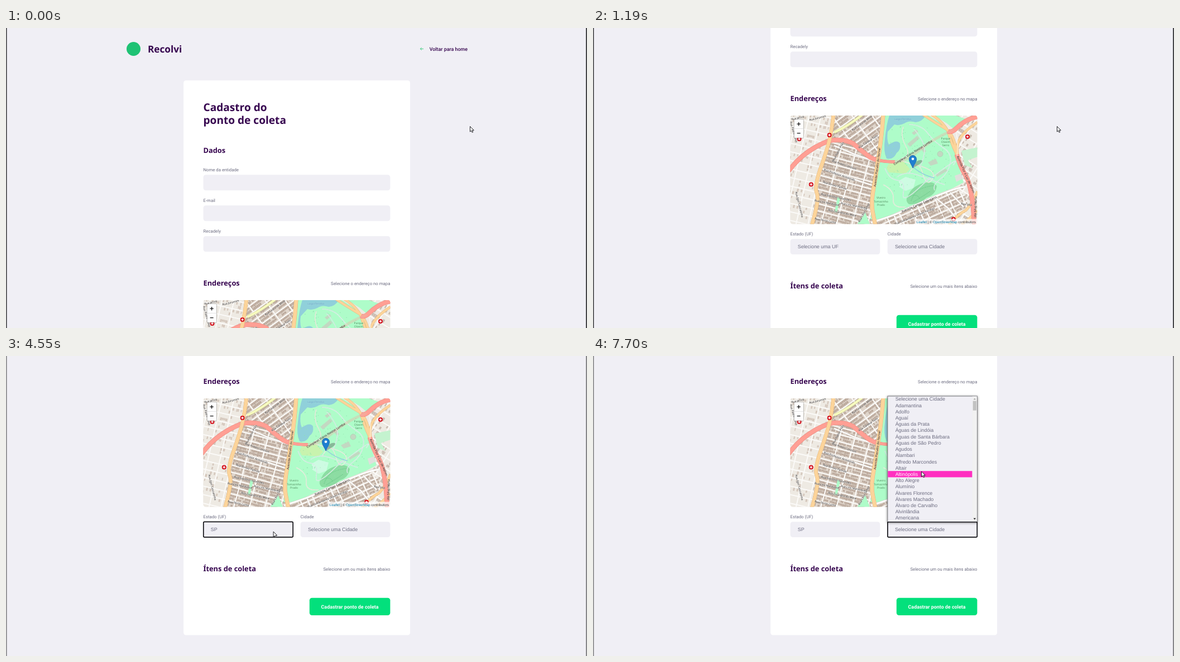
Write an HTML page that moves like this. It is 1041 px wide and 538 px high and loops after 8000 ms.

```html
<!DOCTYPE html>
<html lang="pt-BR">
<head>
<meta charset="utf-8">
<title>Cadastro do ponto de coleta</title>
<style>
  html, body { margin: 0; width: 100%; height: 100%; overflow: hidden; background: #f0eff5; }
  svg { display: block; width: 1041px; height: 538px; }
  text { white-space: pre; text-rendering: geometricPrecision; }
  .head { font: 700 12.8px "Noto Sans", sans-serif; fill: #36054f; }
  .big { font-size: 19.1px; }
  .logo { font-size: 17.2px; }
  .body { font: 400 7.79px Roboto, sans-serif; fill: #6c6c80; }
  .link { font: 500 8.9px Roboto, sans-serif; fill: #36054f; }
  .btn { font: 700 8.9px Roboto, sans-serif; fill: #fff; }
  .input { font: 400 8.9px "Liberation Sans", Arial, sans-serif; fill: #6c6c80; }
  .credit { font: 400 6.1px "Liberation Sans", Arial, sans-serif; fill: #333; }
  .street { font: 500 5px "Noto Sans", sans-serif; fill: #262220; stroke: #fff; stroke-width: .8; paint-order: stroke; stroke-opacity: .6; }
  .road { font-size: 5.5px; fill: #1d1512; stroke-opacity: .25; }
  .green { fill: #3f9458; stroke: #c5f7d4; }
  .lake { fill: #5b9fc0; stroke: #b5dfe6; }
</style>
</head>
<body>
<svg id="stage" viewBox="0 0 1041 538"></svg>
<script>
const NS = 'http://www.w3.org/2000/svg';
const stage = document.getElementById('stage');

function el(tag, attrs, parent, text) {
  const n = document.createElementNS(NS, tag);
  for (const k in attrs) n.setAttribute(k, attrs[k]);
  if (text !== undefined) n.textContent = text;
  parent.appendChild(n);
  return n;
}
const box = (p, x, y, w, h, fill, rx = 0) => el('rect', { x, y, width: w, height: h, fill, rx }, p);
const label = (p, cls, x, y, s, anchor = 'start') =>
  el('text', { class: cls, x, y, 'text-anchor': anchor }, p, s);
const shape = (p, d, fill) => el('path', { d, fill }, p);
const line = (p, d, stroke, w, extra = {}) =>
  el('path', { d, stroke, 'stroke-width': w, fill: 'none', ...extra }, p);

let seed = 7;
const rnd = () => (seed = (seed * 16807) % 2147483647) / 2147483647;

const defs = el('defs', {}, stage);
const FIELD = '#f0eff5', GREEN = '#03e07c';
const LEFT = 353.5, RIGHT = 688.4, RADIUS = 4.5;

/* ---------- page ---------- */
box(stage, 0, 0, 1041, 538, FIELD);
const page = el('g', {}, stage);

el('circle', { cx: 228.5, cy: 37.5, r: 12.5, fill: '#1fc274' }, page);
label(page, 'head logo', 254, 43.8, 'Recolvi');
line(page, 'M748 37.4H742.3M744.8 34.9L742.3 37.4L744.8 39.9', '#34cb79', 0.9);
label(page, 'link', 758.7, 40.7, 'Voltar para home');

box(page, 318.1, 94, 406, 818.5, '#fff', RADIUS);
label(page, 'head big', LEFT, 148.5, 'Cadastro do');
label(page, 'head big', LEFT, 171.8, 'ponto de coleta');
label(page, 'head', LEFT, 223.7, 'Dados');
['Nome da entidade', 'E-mail', 'Recadely'].forEach((s, i) => {
  label(page, 'body', LEFT, 256.8 + i * 55, s);
  box(page, LEFT, 263.2 + i * 55, RIGHT - LEFT, 28.1, FIELD, RADIUS);
});
label(page, 'head', LEFT, 462.2, 'Endereços');
label(page, 'body', RIGHT, 460.7, 'Selecione o endereço no mapa', 'end');
drawMap(el('g', { transform: 'translate(0 412)' }, page));

function select(x, name, value) {
  label(page, 'body', x, 703.2, name);
  box(page, x, 709.2, 160.8, 27.8, FIELD, RADIUS);
  const ring = el('rect', { x: x + .3, y: 709.4, width: 160.4, height: 27.4, rx: 1.8,
    fill: FIELD, stroke: '#101014', 'stroke-width': 1.7 }, page);
  return { ring, text: label(page, 'input', x + 13.3, 726.1, value) };
}
const uf = select(LEFT, 'Estado (UF)', 'Selecione uma UF');
const town = select(527.6, 'Cidade', 'Selecione uma Cidade');

label(page, 'head', LEFT, 798.1, 'Ítens de coleta');
label(page, 'body', RIGHT, 796.5, 'Selecione um ou mais ítens abaixo', 'end');
box(page, 543.8, 845.8, 144.6, 31.2, GREEN, RADIUS);
label(page, 'btn', 616, 864.8, 'Cadastrar ponto de coleta', 'middle');

/* ---------- map ---------- */
function district(g, id, poly, ang, cx, cy, a, b, fill, ground, density) {
  const clip = el('clipPath', { id }, defs);
  el('polygon', { points: poly }, clip);
  const out = el('g', { 'clip-path': `url(#${id})` }, g);
  box(out, 350, 70, 345, 205, '#fbfaf8');
  const inner = el('g', { transform: `rotate(${ang} ${cx} ${cy})` }, out);
  let lots = '', homes = '';
  const bar = (x, y, w, h) => `M${x.toFixed(1)} ${y.toFixed(1)}h${w.toFixed(1)}v${h.toFixed(1)}h${(-w).toFixed(1)}z`;
  for (let y = cy - 130; y < cy + 130; y += a)
    for (let x = cx - 130; x < cx + 130; x += b) {
      lots += bar(x + 1, y + 1, b - 2, a - 2);
      for (let u = x + 1.4; u < x + b - 3; ) {
        const w = 1.4 + rnd() * 2.2, h = (a - 3.2) / 2;
        for (const v of [y + 1.4, y + a / 2 + .2])
          if (rnd() < density) homes += bar(u, v, w, h * (.6 + rnd() * .4));
        u += w + .35;
      }
    }
  shape(inner, lots, ground);
  shape(inner, homes, fill);
}

function drawMap(root) {
  const clip = el('clipPath', { id: 'mapArea' }, defs);
  box(clip, LEFT, 76, RIGHT - LEFT, 194.6, '#000', RADIUS);
  const g = el('g', { 'clip-path': 'url(#mapArea)' }, root);
  box(g, 353, 76, 336, 195, '#eeeae3');

  const brown = '#bba99c', ground = '#dfd5cb', pale = '#eeeae3';
  district(g, 'west', '353,76 431,76 424,118 403,200 392,271 353,271', 13, 390, 175, 15, 21, '#d5c8bd', pale, .16);
  district(g, 'mid', '424,120 458,122 497,152 514,156 504,205 500,271 391,271 404,200', 15, 450, 200, 12.5, 27, brown, ground, .9);
  district(g, 'north', '431,76 519,76 513,156 495,150 458,122 424,118', -36, 470, 110, 13, 29, brown, ground, .85);
  district(g, 'east', '645,76 689,76 689,271 640,271 660,180', 32, 672, 170, 17, 24, '#c9bbb0', pale, .35);
  district(g, 'south', '500,271 556,246 650,206 668,222 672,240 645,271', -24, 590, 250, 12, 23, brown, ground, .85);

  // park
  const mint = '#aefcc9', paved = '#c3d8c2';
  shape(g, 'M521 76H602L634 96L648 125L652 155L664 196L645 206L612 219L556 244L518 262L497 262L505 212L514 150Z', mint);
  shape(g, 'M612 76H650L668 82L646 100L634 90Z', mint);
  shape(g, 'M660 139L689 133V150L672 156L680 170L666 165Z', '#c4f3cf');
  shape(g, 'M438 222l5 2l-6 26l-4-1zM476 266l12-16l8 21h-22z', mint);
  shape(g, 'M531 76H596Q590 87 578 88Q566 84 558 90Q548 95 540 92L528 105Q526 120 530 128Q545 118 550 126Q552 138 544 143Q538 156 526 153Q520 140 523 118Q526 90 531 76Z', '#90d0da');
  shape(g, 'M530 162L556 158L568 172L560 180L530 178L526 170Z', '#c8f3ae');
  shape(g, 'M548 193L560 186L578 191L574 206L560 211L549 204Z', '#cdfbe2');
  shape(g, 'M565 219Q571 203 592 197Q611 192 616 203Q613 219 598 223Q584 237 566 235Q558 228 565 219Z', '#8cdca2');
  line(g, 'M570 229Q576 210 594 205T611 203M574 231Q586 224 604 212M566 222Q580 214 586 226', '#5fc080', 1.2, { 'stroke-dasharray': '1 1.6' });
  shape(g, 'M563 127L581 112L585 117L568 132ZM571 107l9-6l3 4l-8 6zM600 160L614 153L618 162L605 166ZM590 131l7 9l-4 3l-7-9zM614 181l18-10l3 4l-19 11z', paved);
  shape(g, 'M648 184l11-4l4 9l-12 6z', '#dfe0dc');
  el('circle', { cx: 622, cy: 145, r: 5, fill: paved, stroke: '#a9c8ae', 'stroke-width': .6 }, g);
  for (let i = 0; i < 130; i++) {
    const x = 524 + rnd() * 118, y = 96 + rnd() * 122;
    el('circle', { cx: x, cy: y, r: .4 + rnd() * .5, fill: '#8fe3ae' }, g);
  }
  ['M523 170Q530 190 545 192T556 215T585 205T600 190T622 176T645 165',
   'M556 96Q550 112 560 130T556 152T580 165T608 190T590 178T566 181',
   'M566 92Q588 92 600 108T628 134T640 162T622 190T612 210',
   'M520 200Q540 210 538 226T560 240', 'M585 170Q600 140 590 122T574 100M545 186Q560 175 580 182T630 200'
  ].forEach((d, i) => {
    line(g, d, '#e4fdec', 1.5);
    line(g, d, i % 2 ? '#eda79e' : '#a9a4cc', .7, { 'stroke-dasharray': '1.2 1.1' });
  });
  line(g, 'M573 168Q590 183 612 188', '#8fd0dc', 1.6);

  // roads
  const road = (d, w, c, edge) => { line(g, d, edge, w + .8); line(g, d, c, w); };
  const amber = ['#fcd49a', '#dcb078'], salmon = ['#ff9f94', '#e58379'], white = ['#fff', '#cfc8c0'];
  road('M498 268Q540 255 556 247T614 221T668 204', 3, ...white);
  road('M612 222L636 242L652 262M580 235L592 262M540 256L546 271M640 214L664 240', 2.2, ...white);
  road('M432 106Q452 98 482 75', 4, '#f7fabf', '#c9cd8c');
  road('M432 130Q452 138 470 146L505 158M412 172L500 201', 2.2, ...white);
  road('M591 74Q612 88 634 101Q650 114 651 150M606 74Q626 86 636 104Q642 125 650 142M689 88Q664 104 656 120Q650 134 654 150', 4, ...amber);
  road('M638 272Q655 252 668 246Q680 234 689 212M660 271Q676 262 688 246', 4, ...amber);
  road('M689 78Q668 82 652 98Q642 108 636 104', 7.5, ...salmon);
  road('M652 146Q658 168 668 184Q680 205 683 271', 7.5, ...salmon);
  road('M510 156Q524 159 541 159', 5, ...salmon);
  road('M350 176Q362 160 375 149Q398 130 424 121Q448 117 466 126Q484 142 497 151Q504 155 514 157', 7.5, ...salmon);
  line(g, 'M540 159Q562 157 576 145T607 122T646 102', '#e9b4a4', 5, { opacity: .4 });
  road('M431 74Q428 100 424 118T408 170T401 215T392 273', 6, ...amber);
  road('M520 74Q518 108 512 148T503 205Q498 232 501 248T506 273', 6.5, ...amber);
  line(g, 'M651 106Q655 128 652 150', '#fff', .8);

  // names
  const names = [
    ['Rua Jerivá', 367, 82, -13], ['Rua Jurumim', 403, 82, -14], ['Rua Padre Nolvo', 358, 106, 74],
    ['Rua Lauro de Mirel', 483, 91, -36], ['Rua Cardeal Tuvo', 494, 124, -34],
    ['Rua Prates Cordovil', 449, 166, 19], ['Rua Professor Armelindo', 441, 184, 19],
    ['Rua Dirceu Palmão', 433, 203, 17], ['Rua Petrônio Valverdes', 435, 224, 12],
    ['Rua Lins Marduque', 419, 234, 11], ['Rua Lins Marduque', 466, 239, 11],
    ['Rua Lisandro da Mota', 446, 252, 12], ['Rua Tércio Lume', 416, 266, 11],
    ['Rua Célio Tamor', 487, 251, -62], ['Rua Igor Cascatinha', 368, 236, 76],
    ['Rua Nabor Pilão', 441, 141, -62], ['Rua Comandante Otávio Perdigo', 577, 258, -22], ['Rua Ubá', 669, 237, 8]
  ];
  const roads = [
    ['Avenida Planalto do Norvel', 511, 169, -83], ['Complexo Viário Nestor Lumba', 574, 144, -32],
    ['Avenida Campo Celestário', 585, 237, -23], ['Avenida Flor e Luz de Abrim', 666, 182, 66],
    ['ida Silvo Norta', 687, 240, -88]
  ];
  const put = (cls, [s, x, y, r]) => el('text', { class: 'street ' + cls, 'text-anchor': 'middle',
    transform: `translate(${x} ${y}) rotate(${r})` }, g, s);
  names.forEach(n => put('', n));
  roads.forEach(n => put('road', n));
  ['Parque', 'Olavim', 'Serro'].forEach((s, i) => put('green', [s, 632, 118.5 + i * 6.4, 0]));
  ['Viveiro', 'Tomazinho', 'Prado'].forEach((s, i) => put('green', [s, 516, 225 + i * 6.5, 0]));
  put('lake', ['Lago Peroba', 555, 84, 0]);

  [[369.5, 118], [423.6, 111], [390.8, 199.5], [671, 114], [646, 262]].forEach(([x, y]) => {
    el('circle', { cx: x, cy: y, r: 4, fill: '#d3131f' }, g);
    line(g, `M${x - 2.2} ${y}h4.4M${x} ${y - 2.2}v4.4`, '#fff', 1.3);
  });

  // marker
  shape(g, 'M573 170L580 158Q587 154 590 157Q591 161 573 170Z', 'rgba(60,60,60,.35)');
  el('path', { d: 'M573 170.2C571 164 566.4 160 566.4 154A6.6 6.6 0 0 1 579.6 154C579.6 160 575 164 573 170.2Z',
    fill: '#1f7fd0', stroke: '#1c62a6', 'stroke-width': .8 }, g);
  el('circle', { cx: 573, cy: 153.8, r: 2.3, fill: '#fff' }, g);

  // zoom buttons
  box(g, 359.6, 82, 18.4, 35, 'rgba(0,0,0,.22)', 2.2);
  box(g, 360.6, 83, 16.4, 33, '#fff', 1.2);
  line(g, 'M360.6 99.4h16.4', '#ccc', .6);
  line(g, 'M365.4 91.2h6.4M368.6 88v6.4M365.6 107.6h6', '#111', 1.3);

  box(g, 576.5, 261.6, 112, 9, 'rgba(255,255,255,.72)');
  const c = label(g, 'credit', 685.8, 268.5, '', 'end');
  const part = (s, fill) => el('tspan', fill ? { fill } : {}, c, s);
  part('Leaflet', '#0078a8'); part(' | © '); part('OpenStreetMap', '#0078a8'); part(' contributors');
}

/* ---------- drop-down lists ---------- */
const ROW = 11.22, TOP = 71.6;

function popup(x, items, thumb, id) {
  const g = el('g', {}, stage);
  const frame = box(g, x + .3, 72, 160.4, 225.6, FIELD);
  frame.setAttribute('stroke', '#6f6f74');
  frame.setAttribute('stroke-width', .9);
  frame.style.filter = 'drop-shadow(0 1.5px 2px rgba(0,0,0,.55))';
  const clip = el('clipPath', { id }, defs);
  box(clip, x + .7, 72.4, 159.6, 224.8, '#000');
  const view = el('g', { 'clip-path': `url(#${id})` }, g);
  const list = el('g', {}, view);
  const bar = box(list, x, 0, 152, ROW, '#ff2fc0');
  const rows = items.map((s, i) => label(list, 'input', x + 14.1, TOP + (i + .5) * ROW + 3.1, s));
  box(view, x + 152, 72, 9, 226, '#f1f1f1');
  const grip = box(view, x + 153.1, 81, 6.2, thumb, '#c1c1c1');
  const up = shape(view, `M${x + 154} 78.3l2.2-2.6l2.2 2.6z`, '#222');
  shape(view, `M${x + 154} 290.8l2.2 2.6l2.2-2.6z`, '#222');
  line(g, `M${x} 297.6h161`, '#18181c', 1.2);
  return (opacity, active, scroll, total) => {
    g.style.display = opacity ? '' : 'none';
    g.setAttribute('opacity', opacity);
    list.setAttribute('transform', `translate(0 ${-scroll * ROW})`);
    bar.setAttribute('y', TOP + active * ROW);
    rows.forEach((r, i) => { r.style.fill = i === active ? '#fff' : ''; });
    grip.setAttribute('y', 80.6 + (206 - thumb) * scroll / (total - 20));
    up.setAttribute('fill', scroll ? '#222' : '#a3a3a3');
  };
}
const states = 'RO AC AM RR PA AP TO MA PI CE RN PB PE AL SE BA MG ES RJ SP PR SC RS MS MT GO DF'.split(' ');
const towns = ('Adamantina,Adolfo,Aguaí,Águas da Prata,Águas de Lindóia,Águas de Santa Bárbara,' +
  'Águas de São Pedro,Agudos,Alambari,Alfredo Marcondes,Altair,Altinópolis,Alto Alegre,Alumínio,' +
  'Álvares Florence,Álvares Machado,Álvaro de Carvalho,Alvinlândia,Americana,Américo Brasiliense,' +
  'Américo de Campos,Amparo,Analândia,Andradina,Angatuba,Anhembi,Anhumas,Aparecida,' +
  "Aparecida d'Oeste,Apiaí,Araçariguama,Araçatuba,Araçoiaba da Serra,Aramina").split(',');
const showStates = popup(LEFT, ['Selecione uma UF', ...states], 148.5, 'ufList');
const showTowns = popup(527.6, ['Selecione uma Cidade', ...towns], 17, 'townList');

const cursor = el('path', { d: 'M.5 .5V10L2.7 8L4.2 11.3L5.8 10.6L4.3 7.4H7.3Z', fill: '#fff',
  stroke: '#15151a', 'stroke-width': .95, 'stroke-linejoin': 'round' }, stage);
const edges = [box(stage, 0, 0, 1.6, 538, ''), box(stage, 1039, 0, 2, 538, '')];

/* ---------- motion ---------- */
const linear = k => k, smooth = k => k * k * (3 - 2 * k);

// value(s) of a key list [time, ...values] at time t
function at(keys, t, ease = linear) {
  const i = keys.findIndex(k => k[0] > t);
  if (i === 0) return keys[0].slice(1);
  if (i < 0) return keys[keys.length - 1].slice(1);
  const a = keys[i - 1], b = keys[i], k = ease((t - a[0]) / (b[0] - a[0]));
  return a.slice(1).map((v, j) => v + (b[j + 1] - v) * k);
}
const pageKeys = [[490, 0], [560, 22], [700, 94], [910, 202], [1190, 331], [1260, 375], [1330, 412]];
const mouseKeys = [[1610, 831, 176], [2450, 472.3, 315], [4480, 472.3, 315], [4900, 557.3, 307.3],
  [5670, 557.3, 307.3], [5740, 558, 308], [5880, 574, 313], [6580, 574, 313], [6860, 588, 206.5]];
const stateFade = [[2940, 0], [3010, .35], [3080, .75], [3150, 1], [3990, 1], [4060, .65], [4130, .3], [4200, 0]];
const townFade = [[6300, 0], [6370, .6], [6440, 1]];
const townScroll = [[7000, 0], [7420, 12], [7560, 12], [7700, 0]];

function draw() {
  const t = Math.floor(performance.now() % 8000 / 70) * 70;
  page.setAttribute('transform', `translate(0 ${-at(pageKeys, t)[0]})`);
  const [x, y] = at(mouseKeys, t, smooth);
  cursor.setAttribute('transform', `translate(${x} ${y})`);
  edges.forEach(e => e.setAttribute('fill', t < 3010 ? '#454548' : '#858588'));

  uf.ring.style.display = t >= 3010 && t < 6370 ? '' : 'none';
  town.ring.style.display = t >= 6370 ? '' : 'none';
  uf.text.textContent = t < 3430 ? 'Selecione uma UF' : t < 3640 ? 'SE' : 'SP';
  showStates(at(stateFade, t)[0], t < 3430 ? 0 : t < 3640 ? 15 : 20, t < 3640 ? 0 : 1, 28);

  const scroll = at(townScroll, t, smooth)[0];
  const over = t >= 6650 && y < 297;
  const row = over ? Math.floor(Math.min(19.9, (y + .5 - TOP) / ROW) + scroll) : 0;
  showTowns(at(townFade, t)[0], row, scroll, 646);
}
(function loop() { draw(); requestAnimationFrame(loop); })();
</script>
</body>
</html>
```
